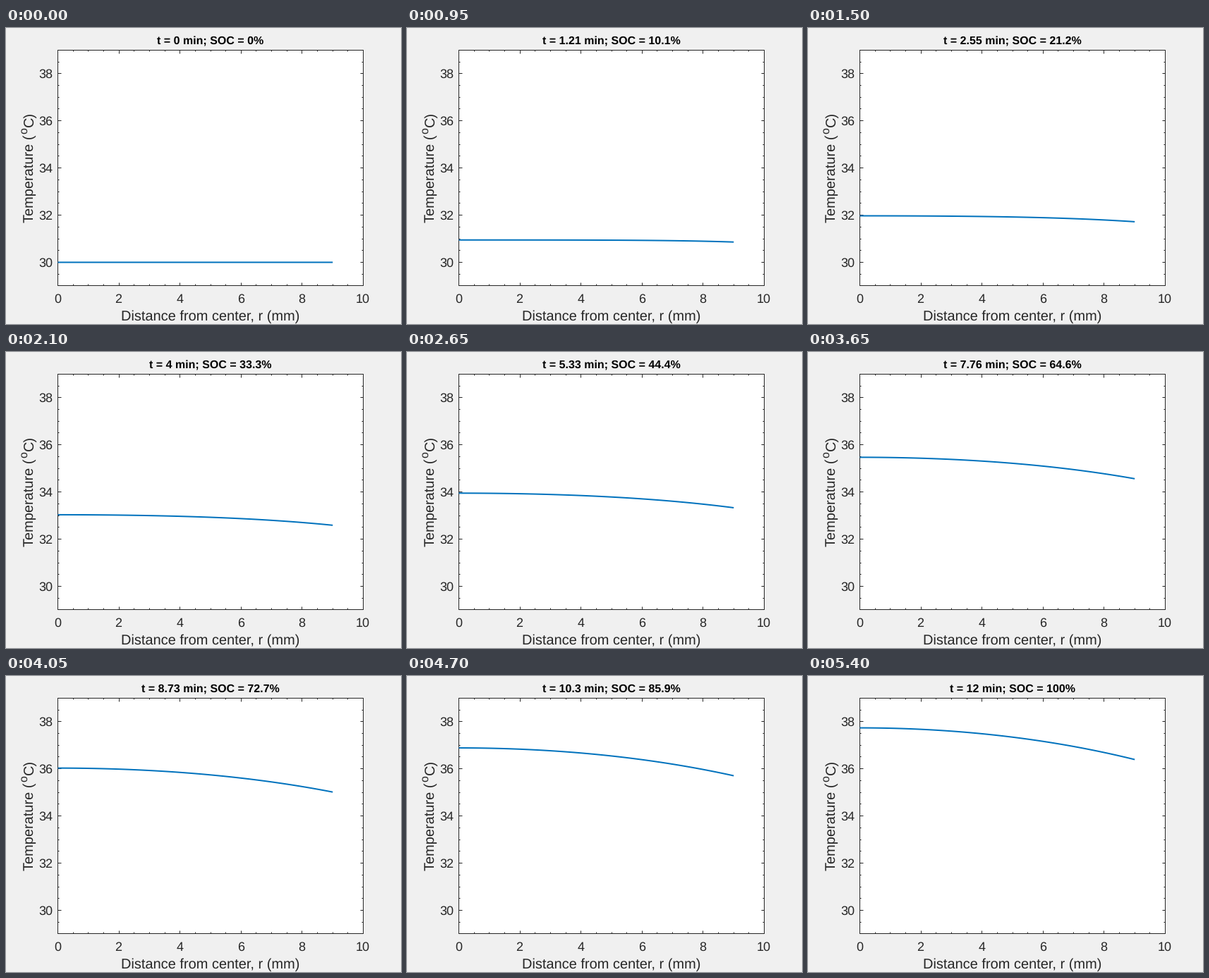
Animation, 560 px wide and 420 px high, one loop 5.45 s. Source, as a matplotlib script:

```python
import numpy as np
import matplotlib.pyplot as plt
from matplotlib.animation import FuncAnimation
from matplotlib.ticker import MultipleLocator, NullFormatter
from matplotlib.transforms import Affine2D

W, H, DPI = 560, 420, 100
PX = 72 / DPI                     # points per pixel
INK, BLUE, PANEL = "#262626", "#0072BD", "#F0F0F0"
LEFT, RIGHT, TOP, BOTTOM = 73, 506, 30.8, 365.45

FRAMES, INTERVAL, HOLD = 109, 50, 9
STEPS, MINUTES = 99, 12.0
RADIUS, T0 = 9.0, 30.0            # mm, deg C
HEAT, DIFF, BIOT = 0.7825, 0.0606, 0.45   # per minute, scaled to the radius

plt.rcParams["font.family"] = "Liberation Sans"
plt.rcParams["text.hinting"] = "none"


def solve(n=60, sub=40):
    """Heated cylinder cooled at its surface: one profile per time step."""
    x = np.linspace(0, 1, n + 1)
    face = (x[1:] + x[:-1]) / 2
    edges = np.concatenate([[0], face, [1]])
    vol = np.diff(edges ** 2) / 2
    flow = face * n
    a = np.diag(flow, 1) + np.diag(flow, -1)
    a -= np.diag(a.sum(axis=1))
    a[-1, -1] -= BIOT
    dt = MINUTES / STEPS / sub
    step = np.linalg.inv(np.eye(n + 1) - dt * DIFF * a / vol[:, None])
    temp = np.zeros(n + 1)
    out = [temp]
    for _ in range(STEPS):
        for _ in range(sub):
            temp = step @ (temp + dt * HEAT)
        out.append(temp)
    return x * RADIUS, T0 + np.array(out)


def label(x, y, s, size, **kw):
    """Text with its baseline at pixel (x, y), y counted from the top."""
    opts = dict(color=INK, ha="center", va="baseline")
    opts.update(kw)
    return fig.text(x / W, 1 - y / H, s, fontsize=size * PX, **opts)


r, profiles = solve()

fig = plt.figure(figsize=(W / DPI, H / DPI), dpi=DPI, facecolor=PANEL)
ax = fig.add_axes([LEFT / W, 1 - BOTTOM / H,
                   (RIGHT - LEFT) / W, (BOTTOM - TOP) / H])
ax.set_xlim(0, 10)
ax.set_ylim(29, 39)
for axis in (ax.xaxis, ax.yaxis):
    axis.set_major_locator(MultipleLocator(2))
    axis.set_minor_locator(MultipleLocator(0.5))
    axis.set_major_formatter(NullFormatter())
for which, length in (("major", 4.5), ("minor", 2.5)):
    ax.tick_params(which=which, direction="in", top=True, right=True,
                   length=length * PX, width=PX, color=INK)
for spine in ax.spines.values():
    spine.set(linewidth=PX, edgecolor=INK)

for v in range(0, 11, 2):
    label(LEFT + v * (RIGHT - LEFT) / 10, 390, str(v), 18)
for v in range(30, 39, 2):
    y = BOTTOM - (v - 29) * (BOTTOM - TOP) / 10
    label(66.5, y + 6.6, str(v), 18, ha="right")

label(290, 415, "Distance from center, r (mm)", 20)
side = dict(rotation=90, rotation_mode="anchor", ha="left")
label(39, 275.5, "Temperature (", 20, **side)
label(30, 150.5, "o", 16, **side)
label(39, 140.5, "C)", 20, **side)

title = label(289.8, 24, "", 16, color="black", weight="bold")

# Strokes run through pixel centres, hence the half-pixel shift.
curve, = ax.plot([], [], color=BLUE, lw=2 * PX, zorder=3,
                 solid_capstyle="butt", snap=False, clip_on=False,
                 transform=ax.transData + Affine2D().translate(0.5, -0.5))


def update(i):
    k = max(0, i - HOLD)
    done = k / STEPS
    title.set_text(f"t = {MINUTES * done:.3g} min; SOC = {100 * done:.3g}%")
    curve.set_data(r, profiles[k])
    return title, curve


anim = FuncAnimation(fig, update, frames=FRAMES, interval=INTERVAL,
                     repeat=True, repeat_delay=0)
plt.show()
```
